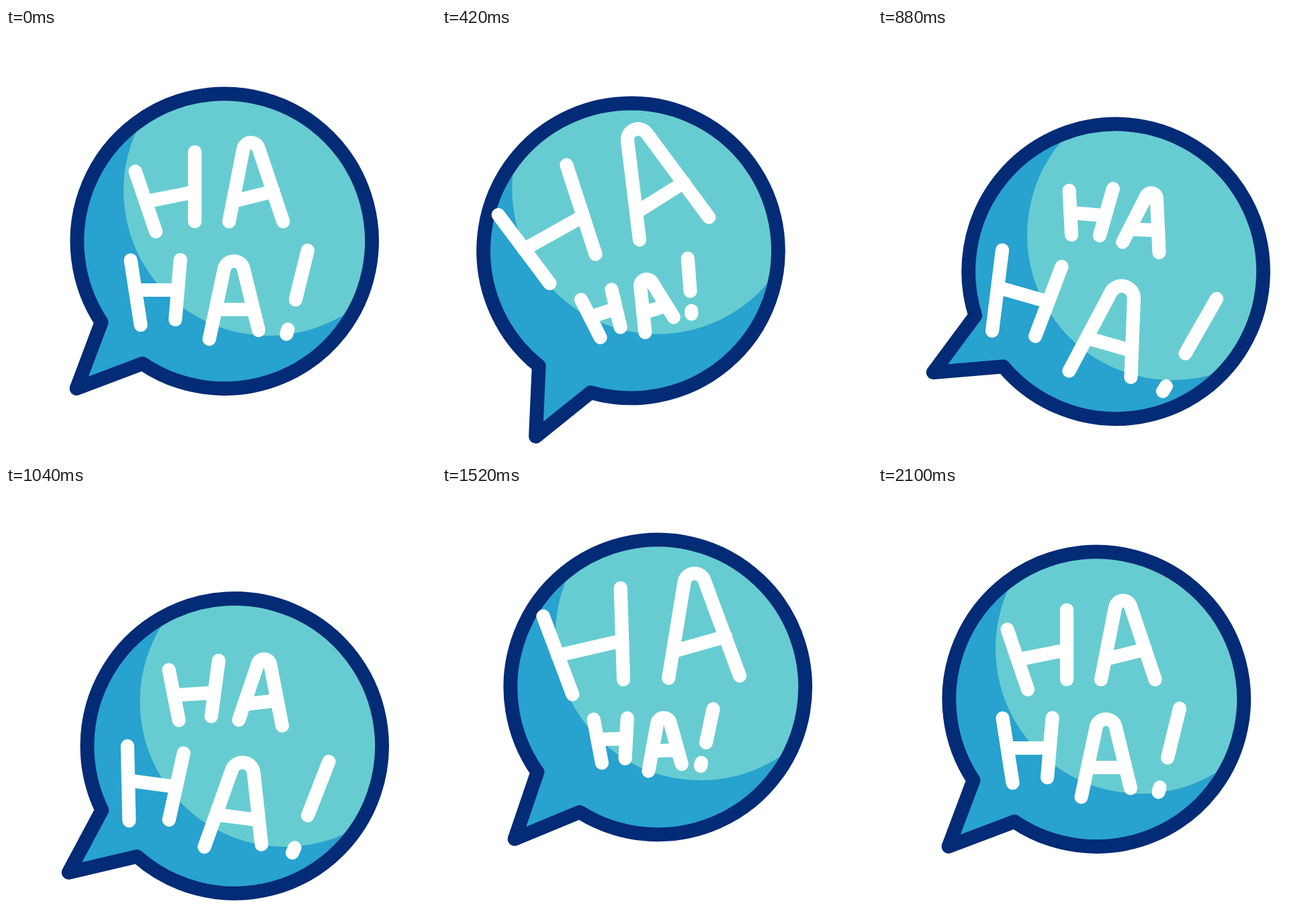
An HTML page for the animation above (2.4 s loop, 640 px wide and 640 px high).

```html
<!DOCTYPE html>
<html lang="en">
<head>
<meta charset="utf-8">
<title>Laughing speech bubble</title>
<style>
  html, body { margin: 0; width: 100%; height: 100%; overflow: hidden; background: #fff; }
  svg { display: block; width: 100%; height: 100%; }
  .letters path {
    fill: none; stroke: #fff; stroke-width: 20.2;
    stroke-linecap: round; stroke-linejoin: round;
    vector-effect: non-scaling-stroke;
  }
</style>
</head>
<body>
<svg viewBox="0 0 640 640" role="img" aria-label="HA HA!">
  <defs>
    <path id="shape" d="M142 438 A219.4 219.4 0 1 1 203 499.5 L105 536.5 Z"/>
    <clipPath id="inside"><use href="#shape"/></clipPath>
  </defs>
  <g id="bubble">
    <use href="#shape" fill="#28a2ce"/>
    <g clip-path="url(#inside)"><circle cx="391" cy="242" r="216" fill="#67ccd1"/></g>
    <use href="#shape" fill="none" stroke="#032b76" stroke-width="20.8" stroke-linejoin="round"/>
    <g id="upper" class="letters">
      <path d="M192.5 213.5 L223 303 M281 184.5 V288 M207.5 258.5 L281 244"/>
      <path d="M332 288 L353 181 A11.8 11.8 0 0 1 376 179 L412.5 288 M338 258 L398 243"/>
    </g>
    <g id="lower" class="letters">
      <path d="M185.5 345.5 L200.5 442 M259.5 345 L252 434 M192.5 390 H255.5"/>
      <path d="M302.5 463 L324.5 360 A14.8 14.8 0 0 1 353.5 358 L376 450 M312 419 H368"/>
      <path d="M449 331 L431 404.5 M419.5 448.5 L417.5 455.5"/>
    </g>
  </g>
</svg>
<script>
  const LOOP = 2400, SETTLE = 2100, TEXT_SETTLE = 1970;

  const ease = u => (1 - Math.cos(Math.PI * u)) / 2;

  // Swings from rest through each peak at its beat, then back to rest.
  function swing(rest, beats, peaks, end) {
    const times = [0, ...beats, end];
    const values = [rest, ...peaks, rest];
    return t => {
      const i = times.findIndex(time => time > t);
      if (i < 0) return rest;
      const u = (t - times[i - 1]) / (times[i] - times[i - 1]);
      return values[i - 1] + (values[i] - values[i - 1]) * ease(u);
    };
  }

  const tilt = swing(0, [395, 850, 1325, 1700], [-18.3, 16.2, -8.6, 4.1], SETTLE);
  const drop = swing(0, [365, 720, 1035, 1440, 1785], [53, -44, 52, -18, 13], SETTLE);

  // The lower word shrinks while the upper one grows.
  const textBeats = [420, 885, 1455];
  const upperPeaks = [1.35, 0.7, 1.33];
  const lowerPeaks = upperPeaks.map(size => 1.88 - 0.915 * size);
  const upperSize = swing(1, textBeats, upperPeaks, TEXT_SETTLE);
  const lowerSize = swing(1, textBeats, lowerPeaks, TEXT_SETTLE);

  const part = id => document.getElementById(id);
  const bubble = part("bubble"), upper = part("upper"), lower = part("lower");

  function scaleAbout(el, x, y, s) {
    el.setAttribute("transform", `translate(${x} ${y}) scale(${s}) translate(${-x} ${-y})`);
  }

  function draw(t) {
    bubble.setAttribute("transform", `translate(0 ${drop(t)}) rotate(${tilt(t)} 199 440)`);
    scaleAbout(upper, 302, 236.5, upperSize(t));
    scaleAbout(lower, 317.5, 397, lowerSize(t));
  }

  const start = performance.now();
  function tick() {
    draw((performance.now() - start) % LOOP);
    requestAnimationFrame(tick);
  }
  draw(0);
  requestAnimationFrame(tick);
</script>
</body>
</html>
```
